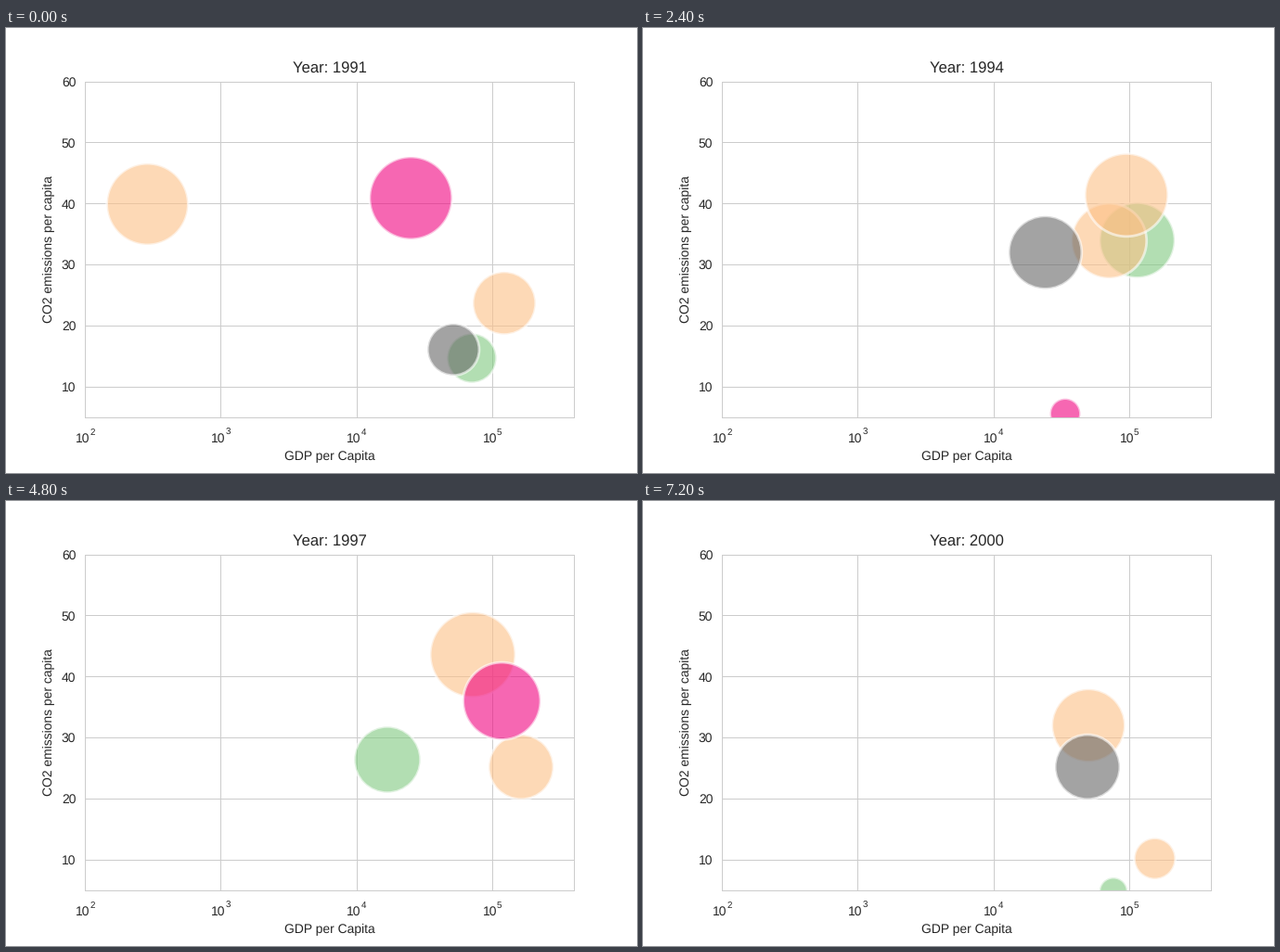
A matplotlib script for the animation above (8000 ms loop, 680 by 480 pixels).

```python
import math

import matplotlib.pyplot as plt
import numpy as np
from matplotlib.animation import FuncAnimation

W, H, DPI = 680, 480, 100
PX = 72 / DPI  # one pixel in points
INK, RULE = "0.15", "0.8"
FIRST, LAST = 1991, 2000
LEFT, RIGHT, TOP, BOTTOM = 0.125, 0.9, 0.88, 0.125

plt.rcParams.update({"font.family": "Liberation Sans", "text.hinting": "none"})

# Key points per country, back to front: log10 of GDP, then CO2.
# Years between keys are interpolated; a CO2 value of 0 hides the bubble.
KEYS = [1991, 1992, 1994, 1996, 1997, 1998, 2000]
TRACKS = {
    "green": ("#7fc97f",
              [4.85, 4.203, 5.059, 5.182, 4.228, 4.731, 4.884],
              [14.7, 28.1, 34, 24.2, 26.4, 10.5, 4.8]),
    "peach": ("#fdc086",
              [2.461, 4.772, 4.852, 3.839, 4.857, 5.067, 4.7],
              [39.9, 41.7, 33.9, 37.9, 43.6, 36.3, 32]),
    "apricot": ("#fdc086",
                [5.089, 5, 4.98, 4.167, 5.213, 5.153, 5.189],
                [23.7, 0, 41.4, 24.9, 25.2, 17.5, 10.2]),
    "pink": ("#f0027f",
             [4.401, 4.963, 4.529, 5.175, 5.071, 5.107, 5.1],
             [40.9, 44.9, 5.6, 12.6, 36, 33.6, 0]),
    "gray": ("#666666",
             [4.714, 4.832, 4.382, 4.464, 4, 3.529, 4.693],
             [16.1, 31.1, 32, 5.6, 0, 38.9, 25.2]),
}

fig = plt.figure(figsize=(W / DPI, H / DPI), dpi=DPI, facecolor="white")
ax = fig.add_axes([LEFT, BOTTOM, RIGHT - LEFT, TOP - BOTTOM])
ax.set_xlim(2, math.log10(4e5))
ax.set_ylim(5, 60)
ax.set_xticks(range(2, 6))
ax.set_yticks(range(10, 61, 10))
ax.set_axisbelow(True)
ax.grid(color=RULE, linewidth=PX)
ax.tick_params(length=0, labelbottom=False, labelleft=False)
for spine in ax.spines.values():
    spine.set(color=RULE, linewidth=PX)


def label(x, y, text, size=10, ha="center", **kw):
    """Place text with its baseline at pixel (x, y) from the top left."""
    return fig.text(x / W, 1 - y / H, text, size=size, ha=ha,
                    va="baseline", color=INK, **kw)


def to_pixel(x, y):
    px, py = ax.transData.transform((x, y))
    return px, H - py


for power in range(2, 6):
    px, _ = to_pixel(power, 5)
    label(px - 10.4, 447, "10", ha="left")
    label(px + 5.1, 439, str(power), size=7, ha="left")
for level in range(10, 61, 10):
    _, py = to_pixel(2, level)
    label(75.3, py + 5, str(level), ha="right")

mid_x = W * (LEFT + RIGHT) / 2
mid_y = H * (1 - (TOP + BOTTOM) / 2)
label(mid_x, 466, "GDP per Capita")
label(50.5, mid_y, "CO2 emissions per capita", rotation=90,
      rotation_mode="anchor")
title = label(mid_x, 49.3, "", size=12)

colors = [color for color, _, _ in TRACKS.values()]
bubbles = ax.scatter([2] * len(colors), [0] * len(colors), c=colors,
                     alpha=0.6, edgecolors="white", linewidths=2)


def draw(i):
    year = FIRST + i
    points = np.array([[np.interp(year, KEYS, gdp), np.interp(year, KEYS, co2)]
                       for _, gdp, co2 in TRACKS.values()])
    bubbles.set_offsets(points)
    bubbles.set_sizes(100 * points[:, 1])
    title.set_text(f"Year: {year}")
    return bubbles, title


anim = FuncAnimation(fig, draw, frames=LAST - FIRST + 1, interval=800,
                     repeat=True, repeat_delay=0, blit=False)
plt.show()
```
